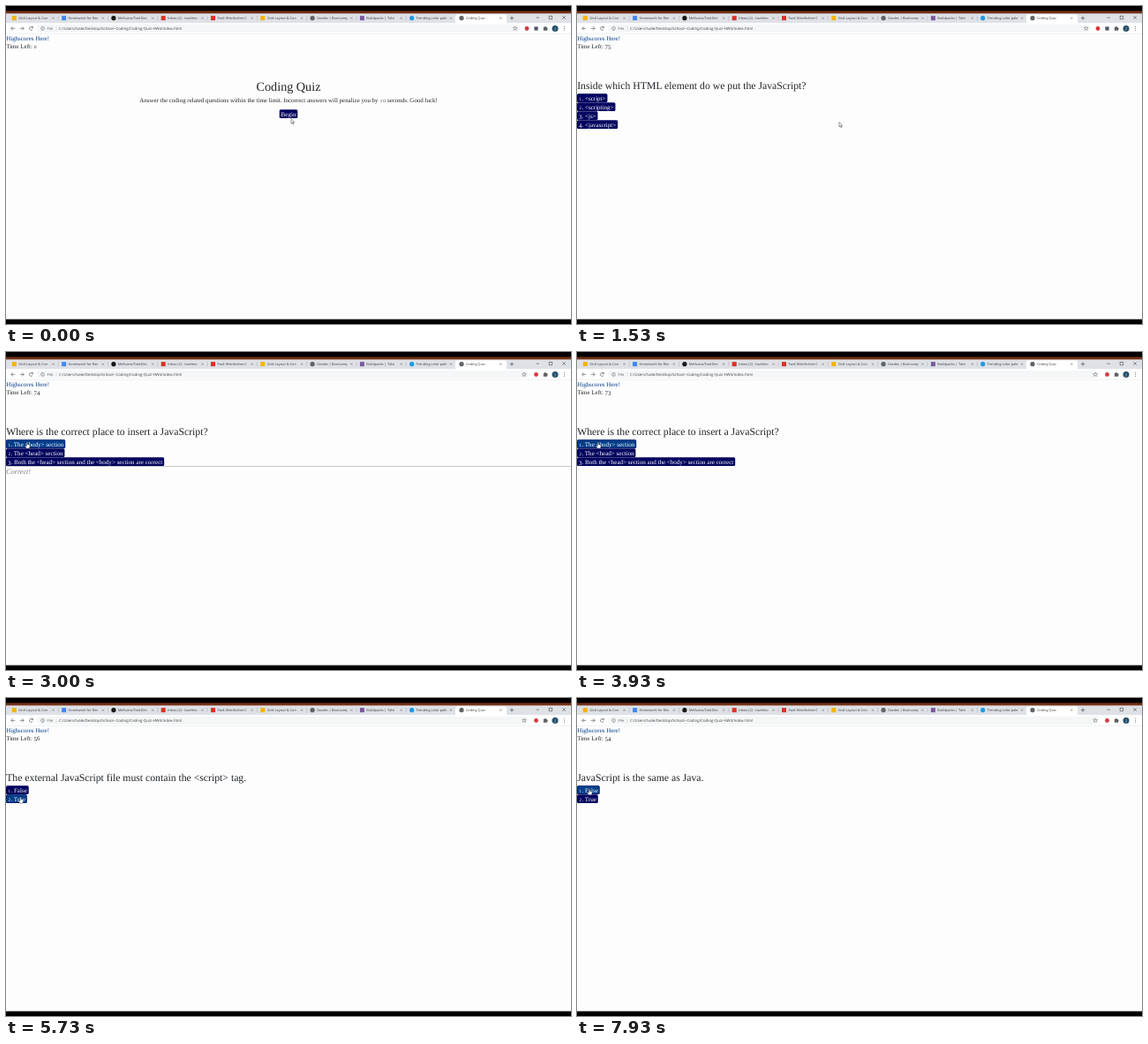
Recreate the animation shown at these times as an HTML page with a canvas. Size 640 px wide and 360 px high, loop 8000 ms.

```html
<!DOCTYPE html>
<html lang="en">
<head>
<meta charset="utf-8">
<title>Coding Quiz</title>
<style>
html, body { margin: 0; width: 100%; height: 100%; overflow: hidden; background: #fdfdfd; }
canvas { display: block; width: 640px; height: 360px; }
</style>
</head>
<body>
<canvas id="stage"></canvas>
<script>
const LOOP = 8000;
const SERIF = '"Liberation Serif", serif';
const SANS = '"Open Sans", sans-serif';
const INK = '#212529', NAVY = '#03045e', BLUE = '#023e8a', GREY = '#5f6368';

const canvas = document.getElementById('stage');
const ctx = canvas.getContext('2d');
const ratio = window.devicePixelRatio || 1;
canvas.width = 640 * ratio;
canvas.height = 360 * ratio;
ctx.scale(ratio, ratio);
ctx.textRendering = 'geometricPrecision';

const tabs = [
  ['Grid Layout & Con', '#f4b400', 'square'],
  ['Homework for Rev', '#4285f4', 'square'],
  ['Mellvano/TaskDec', '#181717', 'circle'],
  ['Inbox (2) - tavelmo', '#d93025', 'square'],
  ['Fwd: Westholme C', '#d93025', 'square'],
  ['Grid Layout & Con', '#f4b400', 'square'],
  ['Grades | Bootcamp', GREY, 'circle'],
  ['Buildpacks | Tolvi', '#79589f', 'square'],
  ['Trending color pale', '#1a9be6', 'circle'],
  ['Coding Quiz', GREY, 'circle']
];

const screens = [
  { at: 0 },
  { at: 1100, title: 'Inside which HTML element do we put the JavaScript?',
    answers: ['<script>', '<scripting>', '<js>', '<javascript>'] },
  { at: 2730, title: 'Where is the correct place to insert a JavaScript?', note: 'Correct!',
    answers: ['The <body> section', 'The <head> section',
      'Both the <head> section and the <body> section are correct'] },
  { at: 4660, title: 'The external JavaScript file must contain the <script> tag.', note: 'Wrong!',
    answers: ['False', 'True'] },
  { at: 6800, title: 'JavaScript is the same as Java.', note: 'Correct!',
    answers: ['False', 'True'] }
];

// time, x, y of the pointer tip
const path = [
  [0, 323, 127.6], [350, 323, 127.6], [750, 322, 122], [1130, 322, 122],
  [1480, 297, 131.5], [1600, 297, 131.5], [2230, 24, 102.3], [4720, 24, 102.3],
  [5300, 16.5, 112.3], [5900, 16.5, 112.3], [6500, 14, 103], [LOOP, 14, 103]
];

function pointerAt(t) {
  const i = path.findIndex(p => p[0] > t);
  const [t0, x0, y0] = path[i - 1], [t1, x1, y1] = path[i];
  const u = (t - t0) / (t1 - t0), e = u * u * (3 - 2 * u);
  return { x: x0 + (x1 - x0) * e, y: y0 + (y1 - y0) * e };
}

function timeLeft(t) {
  if (t < 1100) return 0;
  return 75 - Math.floor((t - 1100) / 1000) - (t >= 4660 ? 15 : 0);
}

function rect(x, y, w, h, color) {
  ctx.fillStyle = color;
  ctx.fillRect(x, y, w, h);
}

function round(x, y, w, h, r, color) {
  ctx.fillStyle = color;
  ctx.beginPath();
  ctx.roundRect(x, y, w, h, r);
  ctx.fill();
}

function dot(x, y, r, color) {
  ctx.fillStyle = color;
  ctx.beginPath();
  ctx.arc(x, y, r, 0, 7);
  ctx.fill();
}

function lines(color, width, ...strokes) {
  ctx.strokeStyle = color;
  ctx.lineWidth = width;
  ctx.beginPath();
  for (const s of strokes) {
    ctx.moveTo(s[0], s[1]);
    for (let i = 2; i < s.length; i += 2) ctx.lineTo(s[i], s[i + 1]);
  }
  ctx.stroke();
}

function sans(str, x, y, size, color) {
  ctx.font = `${size}px ${SANS}`;
  ctx.fillStyle = color;
  ctx.fillText(str, x, y);
}

function serifWidth(str, size) {
  ctx.font = `${size}px ${SERIF}`;
  return ctx.measureText(str).width;
}

// Serif text with old-style figures: 0-2 small, 3 4 5 7 9 lowered
function serif(str, x, y, size, color) {
  ctx.fillStyle = color;
  for (const part of str.split(/(\d)/)) {
    const w = serifWidth(part, size);
    if (/^[012]$/.test(part)) {
      ctx.font = `${size * 0.72}px ${SERIF}`;
      ctx.fillText(part, x + (w - ctx.measureText(part).width) / 2, y);
    } else {
      ctx.fillText(part, x, y + (/^[34579]$/.test(part) ? size * 0.17 : 0));
    }
    x += w;
  }
}

function centered(str, y, size, color) {
  serif(str, 320 - serifWidth(str, size) / 2, y, size, color);
}

function button(label, x, y, pointer) {
  const w = serifWidth(label, 7.05) + 3.8, h = 9.8;
  const hover = pointer.x > x && pointer.x < x + w && pointer.y > y && pointer.y < y + h;
  round(x, y, w, h, 1.5, NAVY);
  if (hover) round(x + 0.4, y + 0.4, w - 0.8, h - 0.8, 1.2, BLUE);
  serif(label, x + 1.9, y + 7.3, 7.05, '#fff');
  return hover;
}

function drawTabs() {
  rect(0, 0, 640, 6, '#000');
  rect(0, 5.5, 640, 3.2, '#6f2f14');
  rect(0, 8.7, 640, 10.8, '#dee1e6');
  round(509, 9.6, 58, 12, 2, '#fff');
  tabs.forEach(([label, color, shape], i) => {
    const x = 6.8 + i * 56.3;
    if (shape === 'square') rect(x, 11.2, 5, 5, color);
    else dot(x + 2.5, 13.7, 2.6, color);
    ctx.save();
    ctx.beginPath();
    ctx.rect(x + 7, 9, 35, 10);
    ctx.clip();
    sans(label, x + 7.4, 15.2, 3.9, '#3c4043');
    ctx.restore();
    lines(GREY, 0.5, [x + 45.7, 12.6, x + 47.9, 14.8], [x + 47.9, 12.6, x + 45.7, 14.8]);
    if (i < 8) lines('#9aa0a6', 0.4, [x + 52.4, 11, x + 52.4, 16.4]);
  });
  lines('#3c4043', 0.6, [570.8, 13.7, 575.2, 13.7], [573, 11.5, 573, 15.9]);
  lines('#202124', 0.5, [600.5, 13.2, 603.8, 13.2], [615.2, 11.4, 618.6, 11.4, 618.6, 14.8, 615.2, 14.8, 615.2, 11.2],
    [630.4, 11.4, 633.8, 14.8], [633.8, 11.4, 630.4, 14.8]);
}

function star(x, y) {
  const points = [];
  for (let i = 0; i <= 10; i++) {
    const a = i * Math.PI / 5 - Math.PI / 2, r = i % 2 ? 1.1 : 2.5;
    points.push(x + r * Math.cos(a), y + r * Math.sin(a));
  }
  lines(GREY, 0.5, points);
}

function drawToolbar(t) {
  const compact = t >= 1870;
  rect(0, 19.4, 640, 12, '#fff');
  round(35, 20.7, compact ? 557 : 547, 9.2, 4.6, '#f5f6f7');
  lines(GREY, 0.7, [10.2, 25.4, 5.8, 25.4], [7.9, 23.3, 5.8, 25.4, 7.9, 27.5],
    [15.8, 25.4, 20.2, 25.4], [18.1, 23.3, 20.2, 25.4, 18.1, 27.5]);
  ctx.beginPath();
  ctx.arc(28.5, 25.4, 2, 0.5, 5.6);
  ctx.stroke();
  lines(GREY, 0.7, [30.4, 22.9, 30.4, 24.7, 28.6, 24.7]);
  ctx.lineWidth = 0.5;
  ctx.beginPath();
  ctx.arc(41.5, 25.4, 2, 0, 7);
  ctx.stroke();
  lines(GREY, 0.5, [41.5, 25, 41.5, 26.6], [41.5, 24, 41.5, 24.5]);
  sans('File', 46.6, 26.9, 4.2, GREY);
  lines('#bdc1c6', 0.4, [57, 23, 57, 28]);
  sans('C:/Users/tvale/Desktop/School--Coding/Coding-Quiz-HW4/index.html', 60, 26.9, 4.35, '#3c4043');

  star(compact ? 587 : 576.7, 25.4);
  dot(compact ? 600.5 : 590, 25.5, 2.4, '#d7373f');
  if (!compact) rect(598.4, 23.4, 4.2, 4.2, '#4a5568');
  rect(608.8, 24, 4.2, 3.8, GREY);
  dot(610.8, 23.8, 0.9, GREY);
  dot(613.1, 25.8, 0.8, GREY);
  dot(622, 25.4, 3.5, '#24506b');
  sans('J', 621.4, 27, 4.2, '#fff');
  for (const y of [23.6, 25.4, 27.2]) dot(632.4, y, 0.5, GREY);
  rect(0, 31, 640, 0.4, '#dadce0');
}

function drawPage(t, pointer) {
  let hover = false;
  serif('Highscores Here!', 0.2, 38.9, 6.95, BLUE);
  serif('Time Left: ' + timeLeft(t), 0.2, 48.2, 6.95, INK);

  const screen = screens.filter(s => s.at <= t).pop();
  if (!screen.title) {
    centered('Coding Quiz', 96.4, 14.2, INK);
    centered('Answer the coding related questions within the time limit. ' +
      'Incorrect answers will penalize you by 10 seconds. Good luck!', 109.4, 6.95, INK);
    return button('Begin', 309.7, 117.3, pointer);
  }

  serif(screen.title, 0.2, 93.9, 11.72, INK);
  screen.answers.forEach((answer, i) => {
    if (button(`${i + 1}. ${answer}`, 0, 99.2 + i * 10, pointer)) hover = true;
  });
  if (screen.note && t < screen.at + 1000) {
    const y = 99.2 + screen.answers.length * 10;
    rect(0, y, 640, 0.7, '#b4b4b4');
    ctx.font = `italic 8.2px ${SERIF}`;
    ctx.fillStyle = '#808080';
    ctx.fillText(screen.note, 0.2, y + 8.9);
  }
  return hover;
}

function drawPointer({ x, y }, hand) {
  const shape = new Path2D(hand
    ? 'M-.6 0Q0-.6 .6 0V2.4L2.7 2.9Q3.3 3.1 3.2 3.8L2.6 6.7H-.9L-2.6 4.2Q-2.4 3.3-.6 4.2Z'
    : 'M0 0V5.4L1.3 4.3L2.2 6.3L3 5.9L2.1 4H3.8Z');
  ctx.save();
  ctx.translate(x, y);
  ctx.fillStyle = '#fff';
  ctx.strokeStyle = '#222';
  ctx.lineWidth = 0.45;
  ctx.fill(shape);
  ctx.stroke(shape);
  ctx.restore();
}

function draw() {
  const t = performance.now() % LOOP;
  const pointer = pointerAt(t);
  rect(0, 0, 640, 360, '#fdfdfd');
  drawTabs();
  drawToolbar(t);
  const hover = drawPage(t, pointer);
  rect(0, 354.6, 640, 5.4, '#000');
  drawPointer(pointer, hover);
  requestAnimationFrame(draw);
}
draw();
</script>
</body>
</html>
```
